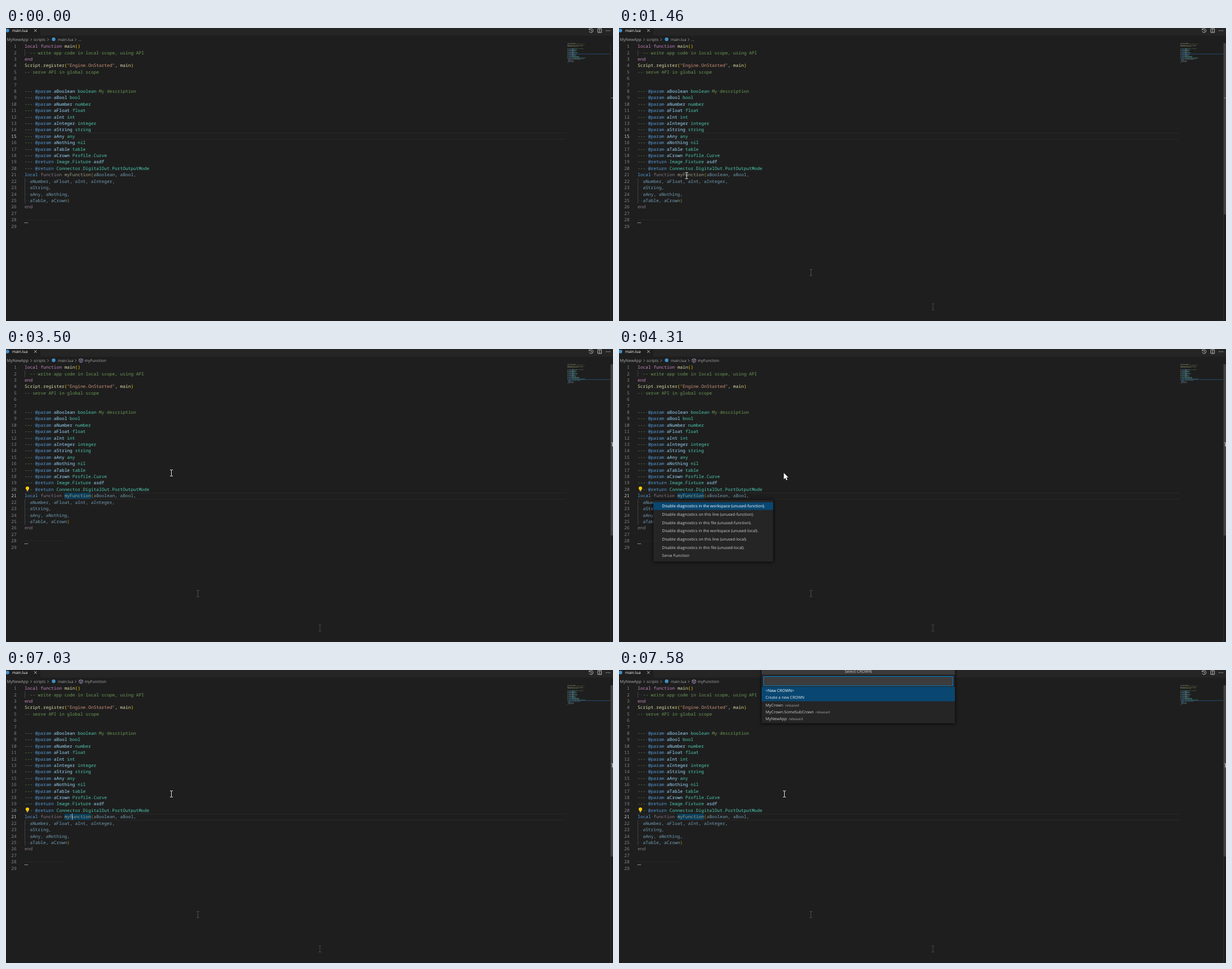
Recreate the animation shown at these times as an HTML page with a canvas. Size 1077x520 px, loop 8000 ms.

```html
<!DOCTYPE html>
<html lang="en">
<head>
<meta charset="utf-8">
<title>Code editor</title>
<style>
html, body { margin: 0; width: 100%; height: 100%; overflow: hidden; background: #1e1e1e; }
canvas { display: block; }
</style>
</head>
<body>
<canvas id="stage" width="1077" height="520"></canvas>
<script>
const ctx = document.getElementById('stage').getContext('2d');
const LOOP = 8000, LEFT = 33, CHAR = 4.71, ROW = 11.41, TOP = 26.6;
const MONO = '500 7.85px "Noto Sans Mono", "DejaVu Sans Mono", monospace';
const ui = size => `${size}px "Open Sans", "Noto Sans", sans-serif`;

const COLORS = {
  k: '#c586c0', l: '#569cd6', y: '#dcdcaa', b: '#ffd700', s: '#ce9178', c: '#6a9955',
  v: '#9cdcfe', t: '#4ec9b0', w: '#d4d4d4', d: '#8b7a8a', f: '#a09f86', u: '#739db3', g: '#b09614'
};
// ^x starts a run in colour x
const param = s => {
  const [name, type, ...rest] = s.split(' ');
  return `^c--- ^l@param ^v${name} ^t${type}` + (rest.length ? ' ^c' + rest.join(' ') : '');
};
const code = [
  '^klocal function ^ymain^b()',
  '^c  -- write app code in local scope, using API',
  '^kend',
  '^yScript^w.^yregister^b(^s"Engine.OnStarted"^w, ^ymain^b)',
  '^c-- serve API in global scope', '', '',
  ...['aBoolean boolean My description', 'aBool bool', 'aNumber number', 'aFloat float',
    'aInt int', 'aInteger integer', 'aString string', 'aAny any', 'aNothing nil',
    'aTable table', 'aCrown Profile.Curve'].map(param),
  '^c--- ^l@return ^tImage.Fixture ^vasdf',
  '^c--- ^l@return ^tConnector.DigitalOut.PortOutputMode',
  '^llocal ^dfunction ^fmyFunction^g(^uaBoolean, aBool,',
  '^u  aNumber, aFloat, aInt, aInteger,',
  '^u  aString,',
  '^u  aAny, aNothing,',
  '^u  aTable, aCrown^g)',
  '^dend', '', '^w' + ' '.repeat(15), ''
].map(line => {
  let col = 0;
  const words = [];
  for (const run of line.split('^').slice(1)) {
    for (const text of run.slice(1).match(/ |[^ ]+/g)) {
      words.push({ text, col, color: COLORS[run[0]] });
      col += text.length;
    }
  }
  return words;
});
const menu = ['function', 'local'].flatMap(kind => ['in the workspace', 'on this line', 'in this file']
  .map(where => `Disable diagnostics ${where} (unused-${kind}).`)).concat('Serve Function');

// time, x, y of the pointer
const path = [[240, 557, 495], [310, 340, 434], [450, 165, 335], [600, 104, 300], [720, 110, 291],
  [990, 116, 271], [1460, 120, 262], [2480, 124, 261], [2690, 220, 238], [2970, 293, 220]];

function rect(x, y, w, h, color) {
  ctx.fillStyle = color;
  ctx.fillRect(x, y, w, h);
}
function text(s, x, y, color, font = ui(7.1), align = 'left') {
  ctx.font = font;
  ctx.textAlign = align;
  ctx.fillStyle = color;
  ctx.fillText(s, x, y);
}
function stroke(d, color = '#c5c5c5', width = 0.9) {
  ctx.strokeStyle = color;
  ctx.lineWidth = width;
  ctx.stroke(new Path2D(d));
}
function dot(x, y, r, color) {
  ctx.fillStyle = color;
  ctx.beginPath();
  ctx.arc(x, y, r, 0, 7);
  ctx.fill();
}
const rowTop = n => TOP + ROW * (n - 1);
const base = n => rowTop(n) + 8.5;

function header(inFunction) {
  rect(0, 0, 1077, 13.5, '#252526');
  rect(0, 0, 61, 13.5, '#1e1e1e');
  dot(2.5, 4.5, 3.2, '#3f8fc9');
  text('main.lua', 11, 7.4, '#ffffff', ui(6.8));
  stroke('M50 2.2l4.6 4.6M54.6 2.2l-4.6 4.6', '#d0d0d0');
  stroke('M1035.2 2.4a3.6 3.6 0 1 1-.4 3.4M1034.6 .9v2.2h2.2M1038.3 2.5v2.4l1.8 1.2');
  stroke('M1050 1.2h6.6v6.8h-6.6zM1053.3 1.2v6.8');
  for (const x of [1065.2, 1068.2, 1071.2]) dot(x, 4.8, 0.75, '#c5c5c5');

  const gray = '#a9a9a9', y = 23;
  text('MyNewApp', 1.5, y, gray, ui(7.2));
  text('scripts', 49, y, gray, ui(6.9));
  dot(84.5, 20, 3.2, '#3f8fc9');
  text('main.lua', 92, y, gray, ui(6.8));
  for (const x of [43.5, 73.5, 122.5]) stroke(`M${x} 18.4l2.2 2.2l-2.2 2.2`, gray, 0.8);
  if (inFunction) {
    stroke('M133 17l3.2 1.5v3.8l-3.2 1.7l-3.2-1.7v-3.8zM129.8 18.5l3.2 1.6l3.2-1.6M133 20.1v3.9', '#b9a0d0', 0.8);
    text('myFunction', 139.5, y, gray, ui(7));
  } else text('...', 128, y, gray);
}

function minimap(active) {
  ctx.globalAlpha = 0.5;
  code.forEach((words, i) => {
    for (const w of words) {
      if (w.text !== ' ') rect(996 + w.col * 0.68, 26.8 + i * 1.36, w.text.length * 0.68, 0.85, w.color);
    }
  });
  ctx.globalAlpha = 1;
  rect(996, 26.6 + (active - 1) * 1.36, 76, 1, '#244a70');
}

function editor(t, active) {
  const y = Math.round(rowTop(active));
  rect(LEFT, y, 960, 1, '#292929');
  rect(LEFT, y + 11, 960, 1, '#292929');
  if (t >= 2210) rect(LEFT + 15 * CHAR, rowTop(21) + 0.2, 10 * CHAR, 11, '#083d5b');
  for (const [from, n] of [[2, 1], [22, 4]]) rect(LEFT, rowTop(from), 1, ROW * n, '#404040');
  code.forEach((words, i) => {
    text(i + 1, 18.6, base(i + 1), i + 1 === active ? '#d0d0d0' : '#858585', MONO, 'right');
    for (const w of words) {
      const x = LEFT + w.col * CHAR;
      if (w.text === ' ') rect(x + 1.9, rowTop(i + 1) + 5.4, 1, 1, '#484848');
      else text(w.text, x, base(i + 1), w.color, MONO);
    }
  });
  for (let i = 0; i < 3; i++) rect(33 + i * 2.2, 345, 1.2, 1.2, '#c8c8c8');
  if (t >= 2480) bulb();
}

function bulb() {
  rect(33, 243.6, 9.2, 10.6, '#1e1e1e');
  dot(38, 247, 3.1, '#ffcc00');
  rect(36.6, 249, 2.8, 1.8, '#ffcc00');
  rect(36.6, 251.3, 2.8, 1, '#d0d0d0');
}

function ruler(t, active) {
  rect(1072, 27, 1, 493, '#303030');
  if (t >= 240) {
    ctx.globalAlpha = Math.min(1, (t - 170) / 140);
    rect(1073, 27, 4, 304, '#424242');
    ctx.globalAlpha = 1;
  }
  rect(1073, 26 + (active - 1) * 7 - 0.5, 4, 1, '#8a8a8a');
  if (t >= 2210) rect(1075, 166, 2, 7, '#a0a0a0');
}

function caretOn(t) {
  if (t < 1990) return false;
  if (t < 4310) return Math.floor((t - 1990) / 497) % 2 === 0;
  return t >= 7030 && t < 7100;
}

function shadow(x, y, w, h) {
  ctx.save();
  ctx.shadowColor = '#000';
  ctx.shadowBlur = 5;
  rect(x, y, w, h, '#252526');
  ctx.restore();
}

function contextMenu(selected) {
  shadow(61, 268, 212.5, 109.5);
  menu.forEach((label, i) => {
    const y = 279 + i * 14.65;
    if (i === selected) rect(61, Math.round(y - 6.8), 212.5, 13.6, '#094771');
    text(label, 76.3, y + 2.4, i === selected ? '#ffffff' : '#d0d0d0', ui(7.07));
  });
}

function picker(caret) {
  shadow(253, -4, 343, 98.5);
  rect(253, 0, 343, 8, '#3a3a3b');
  text('Select CROWN', 424.5, 4.8, '#cccccc', ui(7.2), 'center');
  rect(256, 11, 337, 17.5, '#007fd4');
  rect(257, 12, 335, 15.5, '#3c3c3c');
  if (caret) rect(259, 14, 1, 11, '#d0d0d0');
  rect(253, 30, 343, 25.5, '#094771');
  text('<New CROWN>', 260, 38.8, '#ffffff');
  text('Create a new CROWN', 260, 50.6, '#e4e9ee', ui(6.9));
  ['MyCrown', 'MyCrown.SomeSubCrown', 'MyNewApp'].forEach((name, i) => {
    const y = 64.5 + i * 12.4;
    text(name, 260, y, '#cccccc');
    text('released', 263.4 + ctx.measureText(name).width, y, '#a0a0a0', ui(6.3));
  });
}

function beam(x, y, color = '#e8e8e8') {
  stroke(`M${x - 2.5} ${y - 5.5}h2l.5 .5l.5-.5h2M${x} ${y - 5}v10M${x - 2.5} ${y + 5.5}h2l.5-.5l.5 .5h2`, color, 1);
}
function arrow(x, y) {
  ctx.fillStyle = '#ffffff';
  ctx.fill(new Path2D(`M${x} ${y}v11.2l2.6-2.4l1.8 4l1.9-.8l-1.8-3.9h3.4z`));
}

function pointer(t) {
  if (t < 240) return;
  // faint trail that stays behind
  beam(557, 495, '#484848');
  if (t >= 310) beam(340.5, 434, '#505050');
  if (t >= 4310 && t < 7030) return arrow(292.5, 220);
  const now = 240 + Math.floor((t - 240) / 70 + 0.01) * 70;
  if (t >= 1460 && t < 2480) return beam(120, 262);
  const next = path.findIndex(p => p[0] > now);
  if (next < 0) return beam(293.5, 220);
  const [t0, x0, y0] = path[next - 1], [t1, x1, y1] = path[next];
  const k = (now - t0) / (t1 - t0);
  beam(Math.round(x0 + (x1 - x0) * k), Math.round(y0 + (y1 - y0) * k));
}

function draw(t) {
  const active = t < 1920 ? 15 : 21;
  rect(0, 0, 1077, 520, '#1e1e1e');
  header(t >= 2140);
  editor(t, active);
  minimap(active);
  ruler(t, active);
  if (caretOn(t)) rect(117, 254.5, 1, 11.5, '#aeafad');
  if (t >= 4310 && t < 7030) contextMenu(t < 5840 ? 0 : 6);
  if (t >= 7100) picker(t < 7580);
  pointer(t);
}

ctx.textRendering = 'geometricPrecision';
const start = performance.now();
function tick() {
  draw((performance.now() - start) % LOOP);
  requestAnimationFrame(tick);
}
tick();
</script>
</body>
</html>
```
